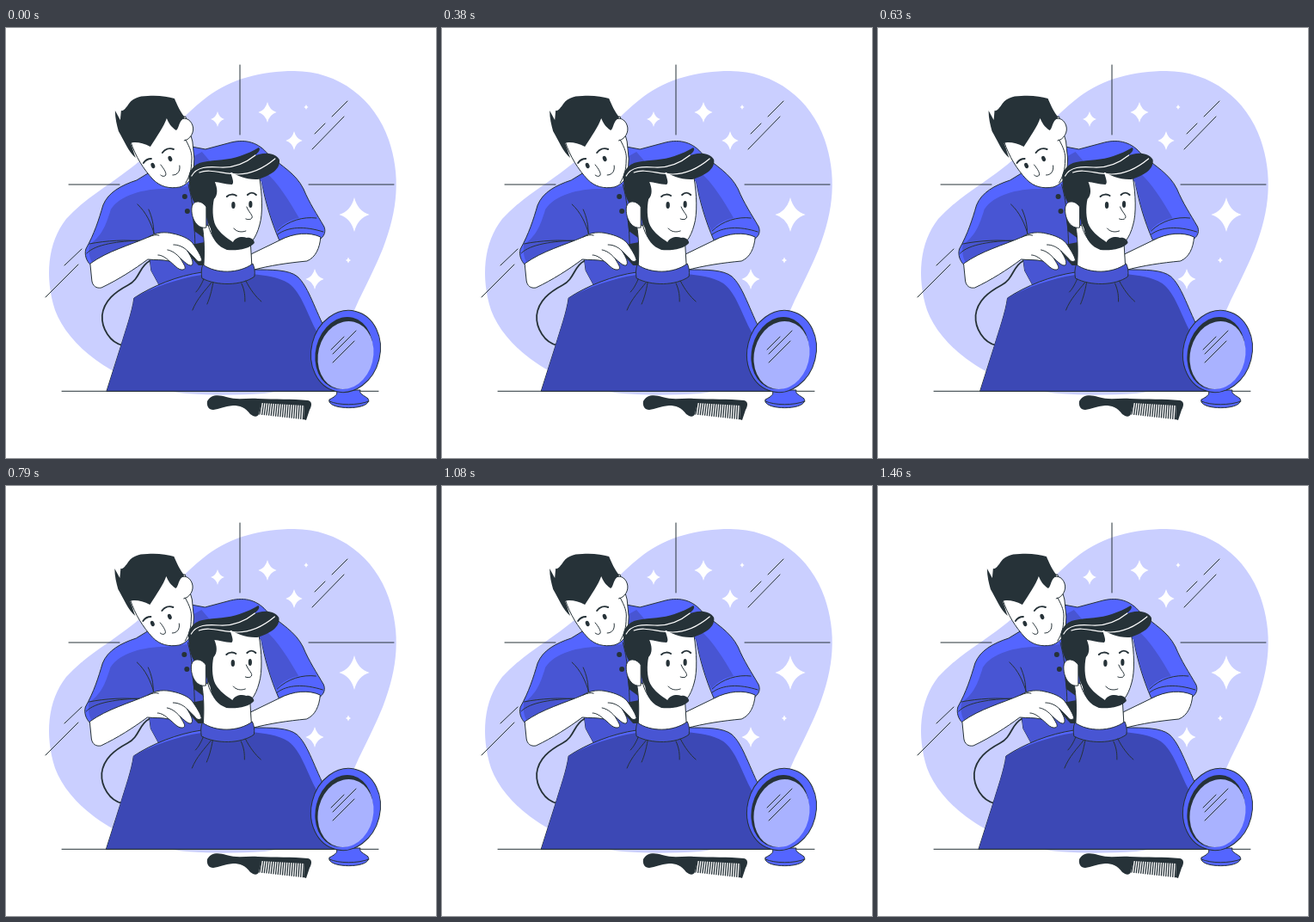
These frames come from a looping animation (500 by 500 pixels, 1500 ms). An HTML page:

```html
<!DOCTYPE html>
<html lang="en">
<head>
<meta charset="utf-8">
<title>Barber</title>
<style>
  html, body { margin: 0; width: 100%; height: 100%; overflow: hidden; background: #fff; }
  svg { display: block; width: 100%; height: 100%; }
  .ink { fill: none; stroke: #263238; stroke-linecap: round; stroke-linejoin: round; }
  .dark { fill: #263238; }
  .skin, .blue, .shade, .cape { stroke: #263238; stroke-linejoin: round; }
  .skin { fill: #fff; }
  .blue { fill: #5465ff; }
  .shade { fill: #4855d3; }
  .cape { fill: #3c48b5; }
  .flat { stroke: none; }
  .shine { fill: none; stroke: #fff; stroke-linecap: round; }
</style>
</head>
<body>
<svg viewBox="0 0 500 500">
  <path fill="#cacfff" d="M335 50C387 50 429 83 445 130C459 171 456 211 438 257C424 292 406 320 397 350C384 390 350 420 300 425C255 428 210 427 183 421C125 408 73 371 57 328C45 290 48 250 70 222C92 198 118 184 145 163C177 139 200 106 234 80C262 59 297 50 335 50Z"/>
  <path class="ink" d="M272 43V124M73 182H132M352 182H451M397 85L379 103M371 111L359 123M393 103L356 141M88 257L68 276M84 275L46 313"/>
  <g id="stars" fill="#fff"></g>

  <g id="people">
    <!-- barber's shirt -->
    <path class="blue" d="M152 177C134 183 119 191 113 206C108 223 103 239 93 257C91 264 94 271 98 275C118 262 140 252 164 244L169 282L181 304L240 290V200L297 176C301 200 308 224 318 247C335 239 352 237 366 245C371 241 372 236 370 231C362 217 353 204 346 187C337 169 321 161 305 147C294 133 279 129 262 133L232 141L216 138Z"/>
    <path class="shade flat" d="M186 187C160 187 133 194 122 211C116 231 111 242 97 252C96 260 97 267 100 272L164 244L169 282L181 304L240 290V200L297 178C302 199 307 219 315 236C322 227 331 223 341 221C329 201 318 181 300 166L240 158L228 144L217 150L212 184Z"/>
    <path class="ink" d="M153 205C163 214 169 227 173 241M166 211C170 220 172 229 172 239M94 262C104 251 132 248 156 247M97 251C117 247 141 246 158 248M316 240C328 231 347 230 369 237M316 236C328 224 346 219 361 221M212 182C216 195 219 216 220 252"/>
    <circle class="dark" cx="208" cy="196" r="3"/>
    <circle class="dark" cx="211" cy="213" r="3"/>
    <path class="skin" d="M285 263L318 247C335 238 353 237 366 243C365 256 360 267 350 271C329 273 307 276 285 282Z"/>

    <!-- barber's head -->
    <path class="skin" d="M145 132C151 150 160 164 171 176C180 185 190 187 202 185C209 183 214 178 218 171L219 152L217 132L209 103L180 104Z"/>
    <path class="skin" d="M201 108C207 103 214 105 217 113C220 121 214 130 207 131"/>
    <path class="ink" d="M209 130C214 139 217 146 216 154C216 164 214 172 209 180"/>
    <path class="dark" d="M127 96L133 107L134 96C137 97 139 93 141 91C146 82 154 79 165 79C178 78 188 80 196 82C199 89 203 98 208 104C200 109 202 116 198 119C192 115 189 110 187 105C184 114 175 127 168 138C159 133 149 132 145 134C148 141 149 147 151 151C143 145 137 130 131 120C129 113 127 105 127 96Z"/>
    <path class="ink" stroke-width="2" d="M160 157C162 154 165 152 169 152M182 145C185 141 190 139 195 141"/>
    <ellipse class="dark" cx="171" cy="160" rx="2.2" ry="3.2" transform="rotate(-25 171 160)"/>
    <ellipse class="dark" cx="191" cy="152" rx="2.2" ry="3.2" transform="rotate(-25 191 152)"/>
    <path class="ink" d="M180 159C184 164 188 170 185 172C183 173 181 172 180 171M194 171C200 171 203 166 202 160"/>

    <!-- cape -->
    <path class="ink" stroke-width="1.8" d="M167 271C155 277 156 292 142 299C127 307 114 317 112 334C111 349 121 366 136 369"/>
    <path class="blue" d="M228 284C200 288 170 300 149 314C147 330 139 352 134 369L117 422.500H401C393 400 380 370 371 350C357 321 351 300 339 289C329 281 310 281 287 281Z"/>
    <path class="cape flat" d="M228 287C200 291 170 302 149 314C147 330 139 352 134 369L117.500 422H400L362 354C350 332 344 308 329 297C316 289 302 288 287 286Z"/>

    <!-- client -->
    <path class="dark" d="M217 220L230 230V244L219 236Z"/>
    <path class="dark" d="M215 252L231 249V276H224L212 263Z"/>
    <path class="skin" d="M228 228C231 245 231 261 230 277C246 288 270 287 286 276L284 242Z"/>
    <path class="shade" d="M229 275C244 286 271 286 287 274C289 278 290 283 289 289C274 300 245 300 228 291C227 286 227 280 229 275Z"/>
    <path class="ink" d="M239 296C232 305 222 315 217 328M241 296C239 307 237 314 234 321M274 297C278 306 278 312 278 318M279 294C284 304 291 313 297 318M230 292C227 299 224 304 221 307"/>
    <path class="skin" d="M240 174C257 165 282 164 295 175C298 193 299 216 295 229C291 244 284 255 270 257C251 259 239 246 235 228Z"/>
    <path class="dark" d="M213 177C211 168 218 158 229 156C244 153 259 154 272 149C280 146 288 143 294 139C297 141 293 146 288 149C298 144 313 144 318 153C320 164 307 172 293 176C281 177 267 171 261 167C263 174 266 180 263 182C255 182 248 179 243 179C246 186 247 194 242 199C240 208 240 222 244 230C249 239 257 244 264 249C267 243 275 242 280 244C284 243 289 246 289 250C283 257 270 259 257 258C247 254 240 247 238 233C233 224 232 212 229 205L219 203C215 196 213 187 213 177Z"/>
    <path class="skin" d="M233 208C227 199 216 200 216 211C216 223 223 234 233 232Z"/>
    <path class="shine" stroke-width="1.2" d="M216 172C222 161 235 161 249 162C266 163 280 156 290 148M225 168C238 163 252 170 270 170C286 170 301 162 313 152"/>
    <path class="ink" stroke-width="2" d="M257 196C260 193 265 193 268 195M281 194C284 191 288 191 291 194"/>
    <ellipse class="dark" cx="264.500" cy="206" rx="2.200" ry="4"/>
    <ellipse class="dark" cx="284.500" cy="205" rx="2.100" ry="4"/>
    <path class="ink" d="M280 208C282 214 288 218 286 221C285 223 281 223 279 222M265 233C268 237 274 238 279 236"/>

    <!-- barber's working hand -->
    <path class="skin" d="M98 274C119 259 143 253 166 243C175 237 186 237 194 239C204 241 213 245 217 250C222 257 227 265 228 270C225 273 222 271 220 268L211 259C216 267 219 273 216 276C212 277 207 271 203 268C207 275 211 280 206 281C200 282 195 274 190 271C181 269 174 270 165 269C149 281 130 293 111 302C105 303 101 300 100 294Z"/>
    <path class="ink" d="M211 259C206 254 200 252 195 252M203 268C198 262 193 259 188 258M190 271C186 267 181 264 177 264M166 243C171 241 174 240 178 241"/>
  </g>

  <path class="ink" d="M65 422.300H433"/>

  <!-- mirror -->
  <path class="blue" d="M383 421H412C410 425 416 427 421 431C427 445 372 445 376 432C384 428 387 425 383 421Z"/>
  <path class="ink" d="M376 434C387 439 409 439 422 434"/>
  <g class="blue">
    <ellipse cx="395" cy="376" rx="40" ry="48" transform="rotate(14 395 376)"/>
  </g>
  <ellipse class="dark" cx="393" cy="378" rx="33" ry="42.500" transform="rotate(14 393 378)"/>
  <ellipse cx="395" cy="380.500" rx="32" ry="40" fill="#a9b2ff" transform="rotate(14 395 380.500)"/>
  <path class="ink" d="M393 359L378 374M407 352L380 379M405 364L380 389"/>

  <!-- comb -->
  <path class="dark" d="M234 434C238 426 247 426 256 429C269 433 279 430 293 431C312 432 333 431 351 433C356 434 356 439 353 444L349 456L346 455L347 439L297 436L294 449C292 453 288 452 284 449C278 441 272 439 264 439C254 440 248 443 241 444C236 444 233 440 234 434Z"/>
  <path id="teeth" class="ink" stroke-width="1.300"/>
</svg>
<script>
  const $ = id => document.getElementById(id);

  const star = ([x, y, r]) => {
    const q = r * 0.2;
    return `<path d="M${x} ${y - r}Q${x + q} ${y - q} ${x + r * 0.88} ${y}Q${x + q} ${y + q} ${x} ${y + r}Q${x - q} ${y + q} ${x - r * 0.88} ${y}Q${x - q} ${y - q} ${x} ${y - r}Z"/>`;
  };
  $('stars').innerHTML = [
    [246, 106, 9], [304, 98, 12], [349, 92, 3], [335, 131, 11],
    [405, 217, 20], [398, 270, 3.5], [359, 292, 12]
  ].map(star).join('');

  let teeth = '';
  for (let i = 0; i < 20; i++) teeth += `M${297 + i * 2.6} 436L${295 + i * 2.65} ${449 + i * 0.3}`;
  $('teeth').setAttribute('d', teeth);

  // Horizontal shake: one offset per tenth of the loop, drawn at 24 steps per second.
  const LOOP = 1500, STEPS = 36;
  const offsets = [0, -1, 2, -4, 4, -4, 4, -4, 2, -1, 0];

  function shake(p) {
    const i = Math.floor(p * 10);
    return offsets[i] + (offsets[i + 1] - offsets[i]) * (p * 10 - i);
  }

  const start = performance.now();
  function draw() {
    const t = (performance.now() - start) % LOOP;
    const step = Math.floor((t + 4) / LOOP * STEPS) % STEPS;
    $('people').setAttribute('transform', `translate(${shake((step + 0.5) / STEPS).toFixed(3)} 0)`);
    requestAnimationFrame(draw);
  }
  draw();
</script>
</body>
</html>
```
